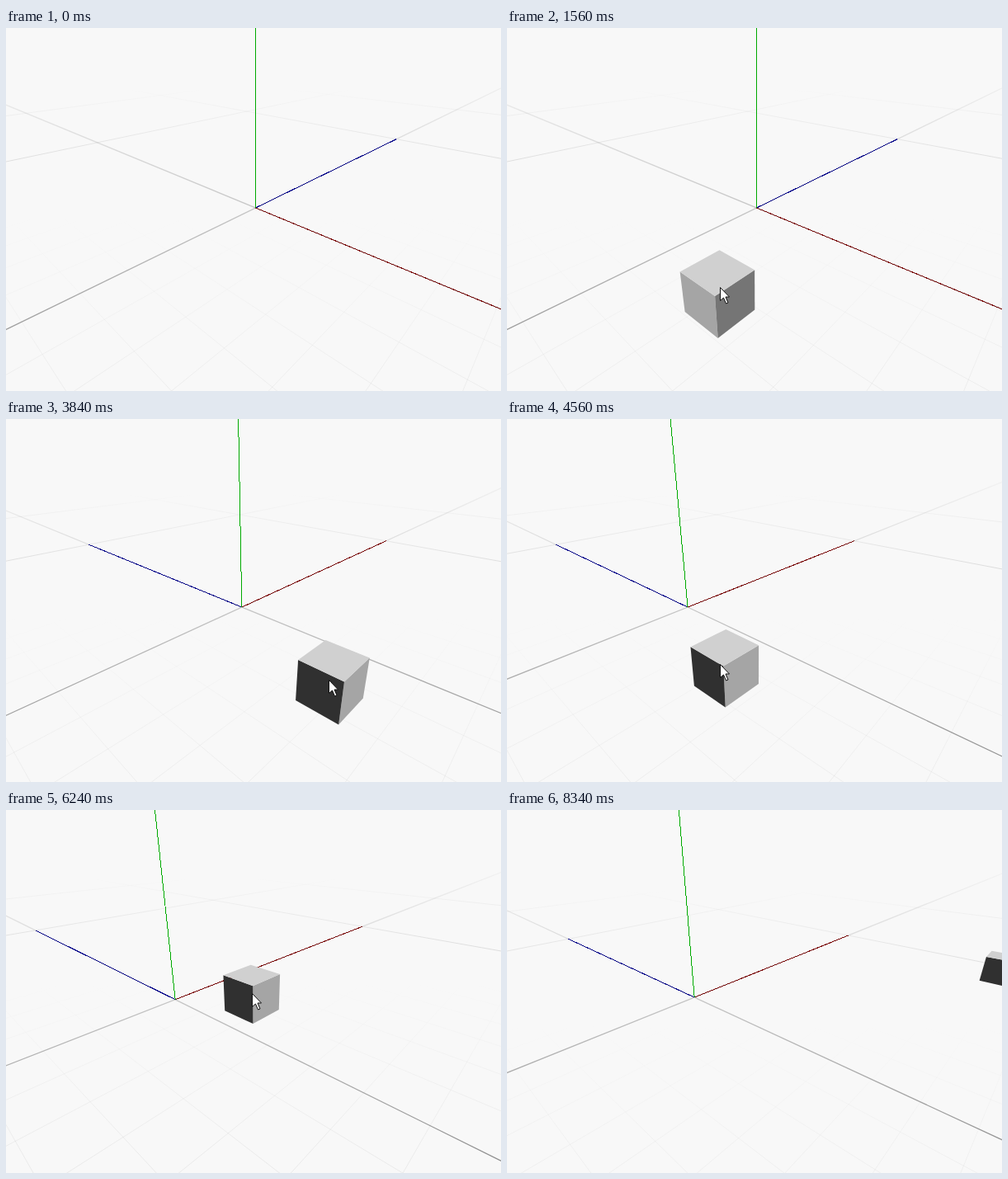
Write an HTML page that moves like this. It is 600 by 440 pixels and loops after 9240 ms.

```html
<!DOCTYPE html>
<html lang="en">
<head>
<meta charset="utf-8">
<title>Cube on a ground grid</title>
<style>
html, body { margin: 0; width: 100%; height: 100%; overflow: hidden; background: #f8f8f8; }
svg { display: block; width: 600px; height: 440px; }
</style>
</head>
<body>
<svg id="stage" viewBox="0 0 600 440"></svg>
<script>
const stage = document.getElementById('stage');
const LOOP = 9240, STEP = 60, ENTER = 540, STOP = 8340;
const CX = 302.5, CY = 218, FOCAL = 415.5;
const HALF = 0.0445, POINTER_LEAD = 20;

// strength and fade distance of each kind of ground line
const AXIS = { reach: 10, strength: 0.55, fade: 8, width: 1.3 };
const MAJOR = { reach: 5, strength: 0.5, fade: 3.2, width: 1 };
const MINOR = { reach: 1, strength: 0.09, fade: 0.95, width: 1 };

// Moves are [start, end, ...goal]; between them the value rests.
const cubeMoves = [
  [540, 1440, 250, 349], [1440, 1620, 260, 304.5],
  [1775, 2940, 470, 284],
  [3060, 3840, 394.8, 316], [3840, 4320, 309, 317],
  [4440, 5000, 104, 235], [5000, 5400, 151.5, 174], [5400, 6060, 298, 221.6],
  [7680, 8400, 625, 189.5]
];
const wheelMoves = [[6060, 6300, 4], [6420, 6720, 8], [6900, 7200, 3], [7380, 7560, -2]];

const clamp = v => Math.min(1, Math.max(0, v));
const ramp = (t, from, to) => clamp((t - from) / (to - from));
const mix = (a, b, k) => a + (b - a) * k;

function follow(moves, origin, t) {
  return moves.reduce((value, [from, to, ...goal]) =>
    value.map((v, i) => mix(v, goal[i], ramp(t, from, to))), origin);
}

let cam;

function setCamera(t) {
  const yaw = mix(-42.6, 47.7, ramp(t, 1775, 2940)) * Math.PI / 180;
  const pitch = Math.atan(mix(0.502, 0.453, ramp(t, 2520, 2940)));
  const [clicks] = follow(wheelMoves, [0], t);
  cam = {
    ca: Math.cos(yaw), sa: Math.sin(yaw), cp: Math.cos(pitch), sp: Math.sin(pitch),
    panX: -0.1988 * ramp(t, 3720, 4320),
    panY: 0.024 * ramp(t, 3720, 3840),
    dist: 0.99 * 0.95 ** clicks
  };
}

const depthOf = ([x, y, z]) => cam.dist + (x * cam.sa + y * cam.ca) * cam.cp - z * cam.sp;

function project(p) {
  const [x, y, z] = p, depth = depthOf(p);
  const side = x * cam.ca - y * cam.sa + cam.panX;
  const down = cam.panY - (x * cam.sa + y * cam.ca) * cam.sp - z * cam.cp;
  return [CX + FOCAL * side / depth, CY + FOCAL * down / depth];
}

// World x, y of a screen point on the plane at height z.
function unproject([px, py], z) {
  const u = (px - CX) / FOCAL, v = (py - CY) / FOCAL;
  const lift = cam.dist - z * cam.sp;
  const s = (cam.panY - z * cam.cp - v * lift) / (cam.sp + v * cam.cp);
  const r = u * (lift + s * cam.cp) - cam.panX;
  return [r * cam.ca + s * cam.sa, s * cam.ca - r * cam.sa];
}

function line(a, b, attrs) {
  return `<line x1="${a[0]}" y1="${a[1]}" x2="${b[0]}" y2="${b[1]}" ${attrs}/>`;
}

function polygon(points, color) {
  const list = points.map(p => p.map(n => n.toFixed(2)).join()).join(' ');
  return `<polygon points="${list}" fill="${color}"/>`;
}

// Opacity goes with 1 / depth, which is linear on screen, so one gradient fits.
let gradients = 0;

function groundLine(alongX, offset, { reach, strength, fade, width }) {
  const at = s => alongX ? [s, offset, 0] : [offset, s, 0];
  const da = depthOf(at(-reach)), db = depthOf(at(reach));
  const ends = [0.45 * cam.dist, fade].map(d => mix(-reach, reach, ramp(d, da, db)));
  if (ends[0] === ends[1]) return '';
  const [a, b] = ends.map(s => project(at(s)));
  const stops = ends.map((s, i) => {
    const alpha = clamp(strength * (1 / depthOf(at(s)) - 1 / fade));
    return `<stop offset="${i}" stop-color="#808080" stop-opacity="${alpha}"/>`;
  });
  const id = `fade${gradients++}`;
  return `<linearGradient id="${id}" gradientUnits="userSpaceOnUse"
    x1="${a[0]}" y1="${a[1]}" x2="${b[0]}" y2="${b[1]}">${stops.join('')}</linearGradient>` +
    line(a, b, `stroke="url(#${id})" stroke-width="${width}"`);
}

function axis(end, color) {
  return line(project([0, 0, 0]), project(end), `stroke="${color}" shape-rendering="crispEdges"`);
}

function grid() {
  let out = '';
  for (const alongX of [true, false]) {
    for (let i = -9; i <= 9; i++) if (i) out += groundLine(alongX, i / 10, MINOR);
    for (let i = -2; i <= 2; i++) if (i) out += groundLine(alongX, i, MAJOR);
  }
  return out;
}

function groundAxis(alongX) {
  return groundLine(alongX, 0, AXIS) +
    (alongX ? axis([1, 0, 0], '#7c0000') : axis([0, 1, 0], '#00008c'));
}

function cube(x, y) {
  const ring = z => [[-1, -1], [1, -1], [1, 1], [-1, 1]]
    .map(([i, j]) => project([x + i * HALF, y + j * HALF, z]));
  const low = ring(0), high = ring(2 * HALF);
  let out = '';
  ['#a5a5a5', '#757575', '#555', '#303030'].forEach((color, i) => {
    const j = (i + 1) % 4, [a, b, c] = [low[i], low[j], high[i]];
    const facing = (b[0] - a[0]) * (c[1] - a[1]) - (b[1] - a[1]) * (c[0] - a[0]);
    if (facing < 0) out += polygon([a, b, high[j], c], color);
  });
  return out + polygon(high, '#d0d0d0');
}

function pointer([x, y]) {
  return `<path transform="translate(${Math.round(x) + 0.5} ${Math.round(y) + 0.5})"
    d="M0 0V16L4 12.5L7 19.5L9.5 18.5L6.5 11.5H11Z" fill="#fff" stroke="#111"/>`;
}

function render(t) {
  setCamera(t);
  gradients = 0;
  const cubeAt = time => follow(cubeMoves, [620, 420], time);
  const present = t >= ENTER;
  const centre = unproject(cubeAt(t), HALF);
  let under = grid(), over = '';
  // An axis running beneath the cube shows through it.
  for (const alongX of [true, false]) {
    const crossed = Math.abs(centre[alongX ? 1 : 0]) < HALF;
    if (present && crossed) over += groundAxis(alongX);
    else under += groundAxis(alongX);
  }
  under += axis([0, 0, 1], '#00aa00');
  if (present) {
    under += cube(...centre);
    over += pointer(cubeAt(t + POINTER_LEAD));
  }
  stage.innerHTML = under + over;
}

const start = performance.now();
let shown = -1;

function tick() {
  const clock = Math.floor((performance.now() - start) % LOOP / STEP) * STEP;
  const t = Math.min(clock, STOP);
  if (t !== shown) render(shown = t);
  requestAnimationFrame(tick);
}
tick();
</script>
</body>
</html>
```
